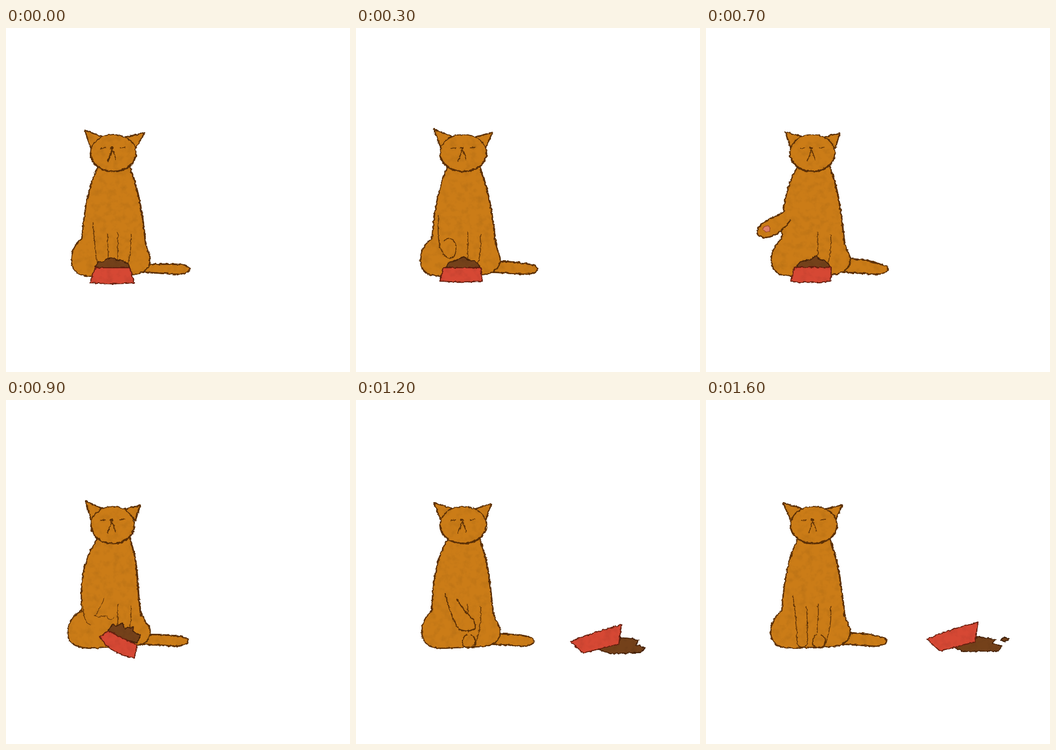
An HTML page that plays this animation: 640x640 px, repeating every 1700 ms.

```html
<!DOCTYPE html>
<html lang="en">
<head>
<meta charset="utf-8">
<title>Cat and bowl</title>
<style>
html, body { margin: 0; height: 100%; overflow: hidden; background: #fff; }
svg { display: block; width: 100vw; height: 100vh; }
path { stroke-linecap: round; stroke-linejoin: round; }
</style>
</head>
<body>
<svg viewBox="0 0 640 640">
  <filter id="crayon" filterUnits="userSpaceOnUse" x="0" y="0" width="640" height="640" color-interpolation-filters="sRGB">
    <feTurbulence id="wobble" type="fractalNoise" baseFrequency=".17" numOctaves="2" result="noise"/>
    <feDisplacementMap in="SourceGraphic" in2="noise" scale="4.5" xChannelSelector="R" yChannelSelector="G" result="drawn"/>
    <feTurbulence id="grain" type="fractalNoise" baseFrequency=".08" numOctaves="4"/>
    <feColorMatrix values=".16 0 0 0 .91  .16 0 0 0 .91  .16 0 0 0 .91  0 0 0 0 1" result="paper"/>
    <feBlend in="drawn" in2="paper" mode="multiply"/>
    <feComposite in2="drawn" operator="in"/>
  </filter>
  <g filter="url(#crayon)"><g id="scene" transform="translate(-1)"></g></g>
</svg>
<script>
const STEP = 100, STEPS = 17;
const FUR = '#cb7c17', INK = '#5c3006', RED = '#d64834', FOOD = '#74411a';
const $ = id => document.getElementById(id);

// Tracks: step -> numbers or path, blended between neighbouring keys.
// ear tips (x y, x y), head left, head right, tail end, tail root y, left haunch, right flank, shoulder
const cat = {
  0: '147 190 259 195 158 243 343 439 122 258 155',
  3: '146 188 255 194 157 244 339 434 120 258 155',
  7: '148 193 250 195 157 241 340 429 122 256 150',
  9: '149 188 251 196 159 240 340 436 115 249 146',
  11: '147 191 252 192 157 243 330 436 124 253 150',
  14: '144 191 255 195 158 245 337 433 121 256 154'
};
const limb = {
  0: 'M163 362C164 390 167 410 170 430C171 450 191 450 191 430C192 415 190 400 190 384',
  3: 'M155 350C152 385 154 408 165 422C175 434 188 428 187 408C186 390 172 388 165 396',
  7: 'M147 340C135 352 110 354 98 372C90 390 108 391 118 389C136 386 146 372 158 358',
  8: 'M147 338C132 352 102 354 90 372C82 388 98 392 110 390C132 387 145 372 158 356',
  9: 'M183 369C180 384 171 394 166 402C174 406 183 400 190 402C188 410 200 410 202 404',
  11: 'M169 358C178 385 186 410 203 414C228 419 240 412 240 402C236 390 208 390 189 364',
  14: 'M163 365C166 395 171 410 170 450C170 463 191 463 190 450C189 430 190 410 188 384'
};
const limbWidth = { 0: '1.4', 3: '1.6', 7: '2.6', 8: '2.6', 9: '1.2', 11: '2.4', 14: '1.5' };
const pad = { 6: '126 386', 7: '114 374', 8: '105 376' };
const bowl = {
  0: 'M167 446L231 446L240 474Q198 478 157 474Z',
  3: 'M164 446L233 446L236 471Q198 474 157 471Z',
  8: 'M166 445L234 445L233 471Q196 476 158 472Z',
  9: 'M192 430L245 456L240 480Q196 474 175 440Z',
  10: 'M322 385L320 432L290 440Q280 405 286 372Z',
  11: 'M458 386L418 428L389 415Q434 346 455 359Z',
  12: 'M490 454L423 471L400 449Q448 430 495 418Z',
  13: 'M502 450L436 467L412 445Q460 424 507 414Z'
};
const food = {
  0: 'M167 445L172 436L184 434L190 429L198 427L206 431L218 433L228 438L231 445L199 449Z',
  8: 'M169 444L177 435L188 432L198 430L208 423L214 431L222 433L229 439L232 445L199 448Z',
  9: 'M191 430L199 417L205 420L218 416L221 425L238 422L237 431L252 438L245 452L216 444Z',
  11: 'M446 411L460 389L480 373L505 358L507 370L526 378L513 386L522 397L490 418L470 412Z',
  12: 'M445 462L466 456L490 452L493 442L516 444L528 448L522 455L540 461L530 470L475 472Z',
  13: 'M457 458L478 452L501 450L505 440L527 443L540 446L534 453L552 458L545 467L480 468Z'
};

function at(track, step) {
  const keys = Object.keys(track).map(Number);
  const from = keys.filter(k => k <= step).pop();
  const to = keys.find(k => k > step) ?? from;
  const mix = to > from ? (step - from) / (to - from) : 0;
  const goal = track[to].match(/[\d.]+/g);
  return track[from].replace(/[\d.]+/g, n => +n + (goal.shift() - n) * mix);
}
const numbers = (track, step) => at(track, step).split(' ').map(Number);
const shape = (d, fill, width, ink = INK) =>
  `<path d="${d}" fill="${fill}" stroke="${ink}" stroke-width="${width}"/>`;
const line = (d, width = 1.4) => shape(d, 'none', width);

function body(tail, root, haunch, flank, shoulder) {
  return shape(`M256 ${root}Q300 ${root} ${tail - 13} 440Q${tail + 4} 444 ${tail - 1} 452Q${tail - 12} 461 300 457L248 454`, FUR, 2.8) +
    shape(`M174 254C${shoulder} 290 ${shoulder - 8} 335 142 392C${haunch + 4} 404 ${haunch - 5} 428 ${haunch + 4} 447` +
      `C${haunch + 12} 460 146 462 165 462Q200 460 236 459C258 457 272 446 269 426` +
      `C265 413 ${flank + 3} 410 ${flank} 375C${flank - 5} 335 246 295 231 256`, FUR, 2.6) +
    line(`M234 268C247 300 ${flank - 4} 340 ${flank} 375L${flank + 3} 402`, 3.2);
}

function frontLegs(step) {
  if (step === 10 || step === 11)
    return line('M229 418L228 437C228 454 216 462 204 460C190 457 194 441 204 441Q215 440 214 420', 1.9);
  const swipe = step === 9 ? line('M145 384Q144 412 158 418') : '';
  return swipe + line('M209 380L209 432') + line('M233 384Q235 410 229 434L223 456') +
    (step > 11 ? line('M207 436C195 444 196 462 212 461C226 460 227 441 215 437', 2) : '');
}

function head(step, earLX, earLY, earRX, earRY, left, right) {
  const mid = (left + right) / 2, r = (right - left) / 2;
  const arc = (sweep, width, fill) =>
    shape(`M${left} 233A${r} ${sweep ? 35 : 34} 0 0 ${sweep} ${right} 233`, fill, width);
  return shape(`M181 202L${earLX} ${earLY}L160 227Z`, FUR, 2.6) +
    shape(`M221 203L${earRX} ${earRY}L242 224Z`, FUR, 2.6) +
    arc(1, 2.2, FUR) + arc(0, 3.2, FUR) +
    line(`M${mid - 23} 224l9 -1M${mid + 13} 223l9 -1`, 1.6) +
    line(`M${mid - 4} 223l3 0`, 4) +
    line(`M${mid - 2} 226Q${mid - 5} 238 ${mid - 10} 247`, step < 2 ? 3 : 1.7) +
    line(`M${mid - 1} 228Q${mid + 3} 236 ${mid + 5} 245`, 1.7);
}

function paw(step) {
  const [x, y] = pad[step] ? numbers(pad, step) : [];
  return shape(at(limb, step), FUR, at(limbWidth, step)) +
    (x ? `<ellipse cx="${x}" cy="${y}" rx="7" ry="5.5" fill="#e0806c" stroke="#a04a2c" stroke-width="1.5"/>` : '');
}

function dish(step) {
  const crumb = step > 12 ? shape('M549 447L556 441L565 444L558 449Z', FOOD, 2, '#3d1f08') : '';
  return shape(at(food, step), FOOD, 2, '#47230a') + crumb +
    shape(at(bowl, step), RED, 2.2, '#67200f');
}

function draw(step) {
  const pose = numbers(cat, step);
  $('wobble').setAttribute('seed', Math.min(step, 14));
  $('grain').setAttribute('seed', step + 20);
  $('scene').innerHTML = body(...pose.slice(6)) + frontLegs(step) + paw(step) +
    head(step, ...pose.slice(0, 6)) + dish(step);
}

let shown = -1;
function tick() {
  const step = Math.floor(performance.now() / STEP) % STEPS;
  if (step !== shown) draw(shown = step);
  requestAnimationFrame(tick);
}
tick();
</script>
</body>
</html>
```
